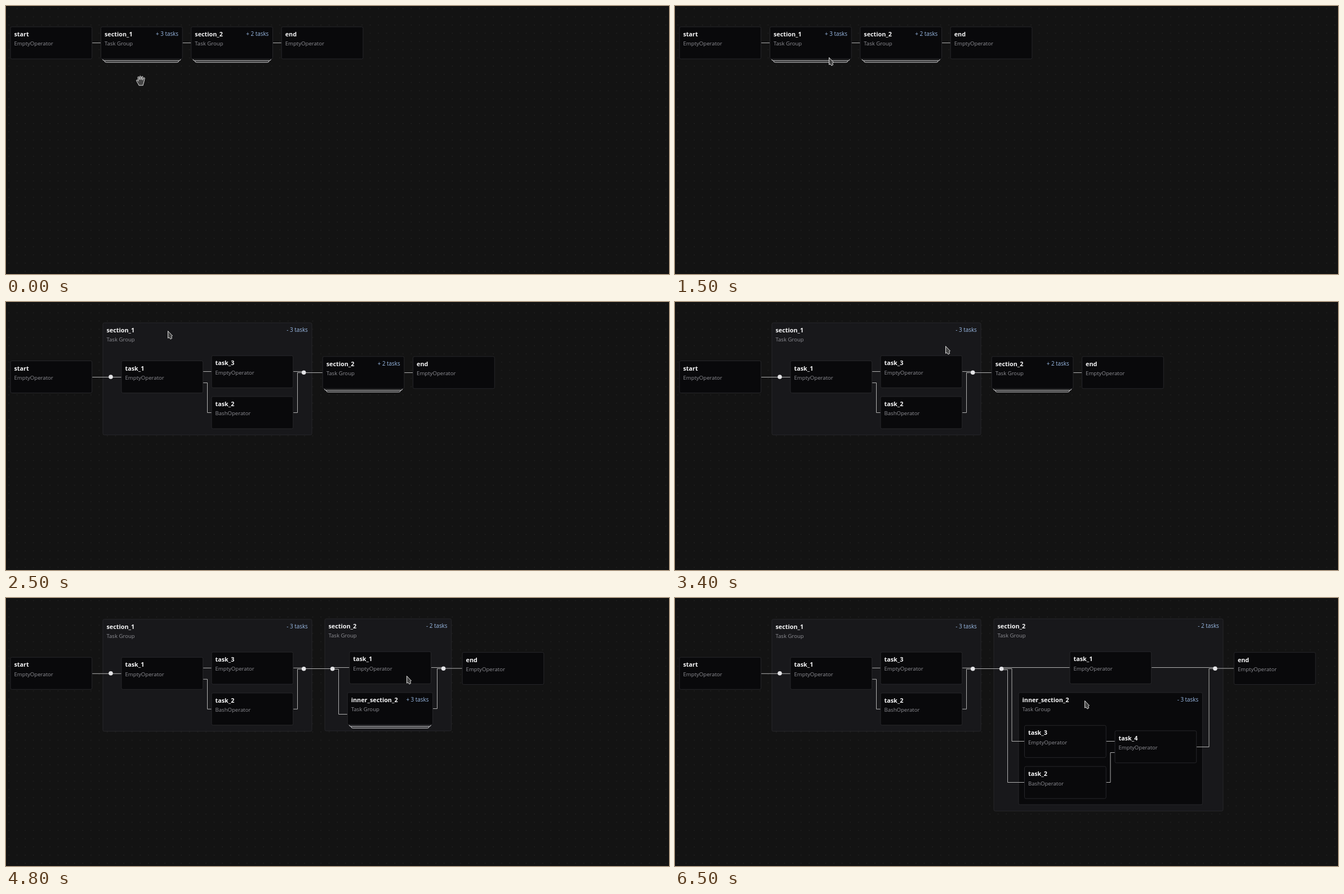
Animation, 1177 px wide and 476 px high, one loop 6600 ms. Source, as an HTML page:

```html
<!DOCTYPE html>
<html lang="en">
<head>
<meta charset="utf-8">
<title>Task graph</title>
<style>
  html, body { margin: 0; width: 100%; height: 100%; overflow: hidden; background: #131313; }
  svg { display: block; width: 1177px; height: 476px; font-family: "Open Sans", "Noto Sans", sans-serif; }
  .node { fill: #09090b; stroke: #27272a; }
  .group { fill: #18181b; stroke: #27272a; }
  .title { font-size: 10.8px; font-weight: 700; fill: #f7f7f8; }
  .kind { font-size: 9.6px; fill: #8f8f95; }
  .count { font-size: 9.9px; fill: #9bbbe6; text-anchor: end; }
  .edge { fill: none; stroke: #b0b0b0; }
  .stack { fill: none; stroke: #e4e4e7; }
  .join { fill: #e4e4e7; }
  .cursor { fill: #464646; stroke: #dedede; stroke-linejoin: round; }
</style>
</head>
<body>
<svg id="stage" viewBox="0 0 1177 476">
  <defs>
    <pattern id="dots" width="14.58" height="14.58" patternUnits="userSpaceOnUse">
      <circle cx="5" cy="4.6" r=".65" fill="#2c2c2c"/>
    </pattern>
  </defs>
  <rect width="1177" height="476" fill="#131313"/>
  <rect width="1177" height="476" fill="url(#dots)"/>
</svg>
<script>
const stage = document.getElementById('stage');
const LOOP = 6600, STEP = 100, NODE_W = 144.7, NODE_H = 57;

const box = (cls, x, y, w, h) =>
  `<rect class="${cls}" x="${x}" y="${y}" width="${w}" height="${h}" rx="2.5"/>`;

const labels = (x, y, w, title, kind, count) =>
  `<text class="title" x="${x + 6.5}" y="${y + 17}">${title}</text>` +
  `<text class="kind" x="${x + 6.5}" y="${y + 33.4}">${kind}</text>` +
  (count ? `<text class="count" x="${x + w - 7.2}" y="${y + 15.8}">${count} tasks</text>` : '');

const task = (x, y, title, kind = 'EmptyOperator') =>
  box('node', x, y, NODE_W, NODE_H) + labels(x, y, NODE_W, title, kind);

const openGroup = (x, y, w, h, title, count, cls = 'group') =>
  box(cls, x, y, w, h) + labels(x, y, w, title, 'Task Group', '- ' + count);

const bracket = (x, y, w) =>
  `<path class="stack" d="M${x} ${y - 2.5}q.5 2.5 3 2.5h${w - 6}q2.5 0 3-2.5"/>`;

const closedGroup = (x, y, title, count, w = NODE_W) =>
  bracket(x + 3, y + 60, w - 6) + bracket(x + 6.3, y + 63, w - 12.6) +
  box('node', x, y, w, NODE_H) + labels(x, y, w, title, 'Task Group', '+ ' + count);

const edge = d => `<path class="edge" d="${d}"/>`;
const join = (x, y) => `<circle class="join" cx="${x}" cy="${y}" r="3.8"/>`;

// The left half of the graph once section_1 is open; dy nudges it after a relayout.
const firstHalf = dy => `<g transform="translate(0 ${dy})">` +
  openGroup(172, 37, 371, 199, 'section_1', 3) +
  edge('M153 133.5H205') + edge('M349 123.5H365') +
  edge('M349 143.5H357.5V196.5H365') +
  edge('M510 123.5H529') + edge('M510 196.5H517.5V125.5H529') +
  task(8, 104.5, 'start') + task(205, 104.5, 'task_1') +
  task(365, 95.3, 'task_3') + task(365, 168, 'task_2', 'BashOperator') +
  join(186, 133) + '</g>';

const scenes = [
  { from: 0, svg:
    edge('M153 65.5H489') +
    task(8, 37, 'start') + closedGroup(168.5, 37, 'section_1', 3) +
    closedGroup(328.8, 37, 'section_2', 2) + task(489.2, 37, 'end') },
  { from: 2500, svg:
    firstHalf(0) + edge('M529 125.5H723') + join(528.7, 125.2) +
    closedGroup(562.2, 96.8, 'section_2', 2) + task(722.6, 96.8, 'end') },
  { from: 4300, svg:
    firstHalf(.8) + openGroup(566, 37, 224.7, 199, 'section_2', 2) +
    edge('M529 125.5H580') + edge('M580 123.5H610') +
    edge('M580 126.5H590.5V206.5H606') + edge('M754 123.5H777') +
    edge('M757 196.5H765.5V125.5H777') + edge('M777 125H810') +
    task(609.8, 95.3, 'task_1') + closedGroup(606.2, 168, 'inner_section_2', 3, 151.4) +
    task(810.1, 96.6, 'end') +
    join(528.7, 125.7) + join(579.6, 125.7) + join(776.6, 125.2) },
  { from: 5600, svg:
    firstHalf(.8) + openGroup(566, 37, 407, 341.3, 'section_2', 2) +
    openGroup(610, 168, 326.4, 199, 'inner_section_2', 3, 'node') +
    edge('M529 125.5H580') + edge('M580 123.5H701') +
    edge('M580 125.5H598V254.5H620') + edge('M580 127.5H590.5V327.5H620') +
    edge('M765 254.5H781') + edge('M765 327.5H773V274.5H781') +
    edge('M845 123.5H959') + edge('M925 264.5H948V125.5H959') + edge('M959 125H992') +
    task(701, 95.3, 'task_1') + task(620.5, 226.3, 'task_3') +
    task(620.5, 299.2, 'task_2', 'BashOperator') + task(781, 235.8, 'task_4') +
    task(992.4, 96.6, 'end') +
    join(528.7, 125.7) + join(579.6, 125.7) + join(958.9, 125.2) }
];

const cursorPaths = {
  arrow: 'M.5.5L8.5 9L6.6 10.2L7.6 13.4L5 15L2.8 12L.5 13.2Z',
  pointer: 'M-1.7 1.6C-2-.2 0-.6.8 1L3 6C5.5 5.4 8 6.4 8.4 8.6L8.5 11.5L7.4 15.3L1.4 15.8' +
    'C-1.4 13.2-3 11.8-5.5 9.8C-6.2 8-4 7.3-2.5 8.3L.3 8.8Z',
  grab: 'M-7.5-1C-7-2.5-5-1.5-4 .5L-5-6C-5-8-3-8-2.6-6L-2-2L-1.8-7.3C-1.6-9.2.4-9.2.5-7.3' +
    'L.7-2L2-7C2.4-8.8 4.3-8.3 4-6.5L3.4-1.5L5.2-5C6-6.5 7.8-5.8 7.2-4L5.6 3' +
    'C5 5 4.5 6 4.2 8L-3 8C-4 5-7 2-7.5-1Z'
};

const easeIn = u => u ** 1.5;
const easeOut = u => 1 - (1 - u) ** 2;
const easeInOut = u => u * u * (3 - 2 * u);

// Each leg: start, end, destination and easing.
const origin = [239, 133];
const legs = [
  [1000, 1500, [273, 91], easeIn],
  [1500, 2000, [287, 51], easeOut],
  [2800, 4000, [673, 105], easeInOut],
  [4500, 4800, [711, 138], easeIn],
  [4800, 5300, [727, 182], easeOut]
];

function cursorAt(t) {
  let point = origin;
  for (const [start, end, to, ease] of legs) {
    if (t < start) break;
    const k = ease(Math.min(1, (t - start) / (end - start)));
    point = point.map((v, i) => v + (to[i] - v) * k);
  }
  return point;
}

function cursorShape(t, [x, y]) {
  if (t < 2500) return y > 94 ? 'grab' : y < 56 ? 'pointer' : 'arrow';
  if (t < 4300) return x > 543 && x < 562 ? 'grab' : x > 659 ? 'pointer' : 'arrow';
  return t < 5600 && y > 175 ? 'pointer' : 'arrow';
}

stage.insertAdjacentHTML('beforeend',
  scenes.map(s => `<g class="scene">${s.svg}</g>`).join('') + '<path class="cursor"/>');
const sceneEls = stage.querySelectorAll('.scene');
const cursor = stage.querySelector('.cursor');

function draw() {
  const t = Math.floor(performance.now() % LOOP / STEP) * STEP;
  const current = scenes.findLastIndex(s => t >= s.from);
  sceneEls.forEach((el, i) => el.style.display = i === current ? '' : 'none');
  const point = cursorAt(t);
  cursor.setAttribute('d', cursorPaths[cursorShape(t, point)]);
  cursor.setAttribute('transform', `translate(${point.map(Math.round)})`);
  requestAnimationFrame(draw);
}
draw();
</script>
</body>
</html>
```
